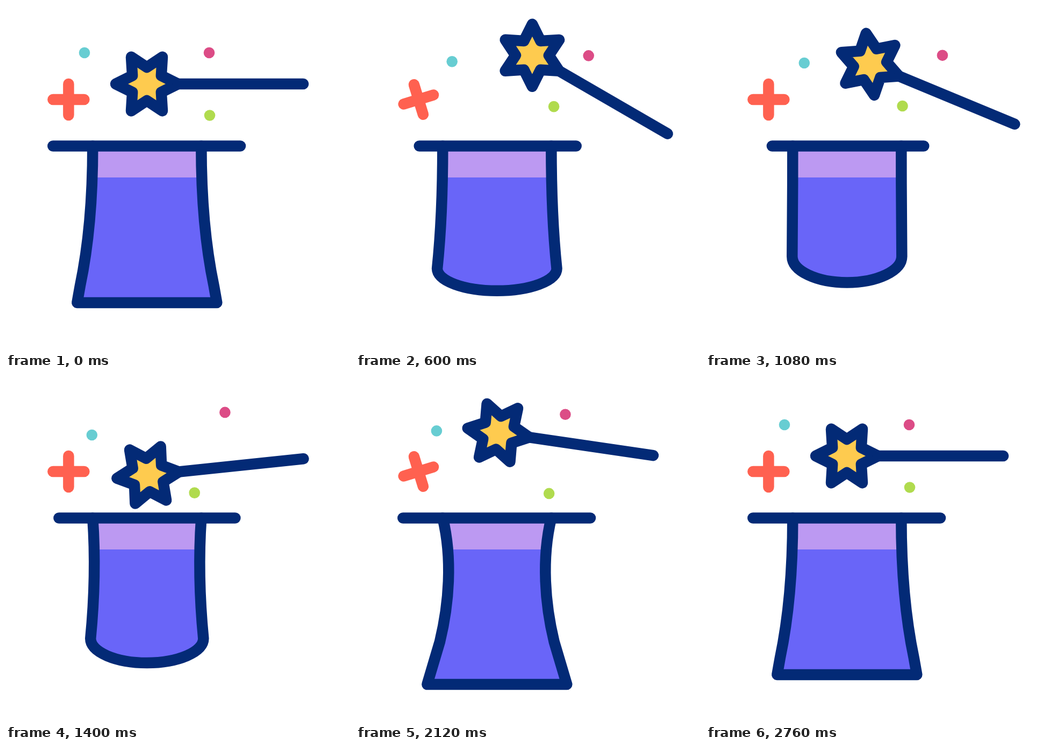
Recreate the animation shown at these times as an HTML page with a canvas. Size 640 by 640 pixels, loop 3 s.

```html
<!DOCTYPE html>
<html lang="en">
<head>
<meta charset="utf-8">
<title>Magic hat</title>
<style>
  html, body { margin: 0; width: 100%; height: 100%; overflow: hidden; background: #fff; }
  canvas { display: block; }
</style>
</head>
<body>
<canvas id="stage" width="640" height="640"></canvas>
<script>
const ctx = document.getElementById('stage').getContext('2d');
const LOOP = 3000, TAU = Math.PI * 2, DEG = TAU / 360;
const NAVY = '#032a76';
const HAT = { x: 262.3, top: 260.5, half: 101, foot: 130 };

const mix = (a, b, s) => a.map((v, i) => v + (b[i] - v) * s);

// Smooth step from 0 to 1 between two values.
function ramp(v, from, to) {
  const p = Math.min(1, Math.max(0, (v - from) / (to - from)));
  return p * p * (3 - 2 * p);
}

// Moves through the poses and back to the first; each leg is [start, end].
function cycle(t, poses, legs) {
  return legs.reduce(
    (pose, [start, end], i) => mix(pose, poses[(i + 1) % poses.length], ramp(t, start, end)),
    poses[0]);
}

const hatLegs = [[360, 790], [1155, 1864], [2060, 2740]];
const shoulderLegs = [hatLegs[0], [1155, 1500], hatLegs[2]];
const bellyPoses = [[101, 552], [101, 514.5], [82, 570.5]];         // waist, bottom
const shoulderPoses = [[124.5, 521], [102, 466], [105.8, 489.5]];   // half width, y

const wandLegs = [[0, 670], [914, 1462], [1690, 2180], [2270, 2760]];
const wandPoses = [[553, 145, 0], [580.5, 240.5, 31], [552.5, 147, -7.3], [553, 144, 9]]; // handle x, y, angle

const dotLegs = [[100, 755], [1015, 1577], [1650, 2740]];
const dots = [
  ['#67cdd2', [[146, 87], [184, 106], [152.5, 106]]],
  ['#dc4c86', [[378, 87], [441.6, 93.3], [397, 55]]],
  ['#b0db4e', [[379, 203.5], [366.3, 184.5], [346, 222.5]]]
];

const cloth = ctx.createLinearGradient(0, 318.5, 0, 319.5);
cloth.addColorStop(0, '#bc99f2');
cloth.addColorStop(1, '#6965f8');

function line(x1, y1, x2, y2) {
  ctx.beginPath();
  ctx.moveTo(x1, y1);
  ctx.lineTo(x2, y2);
  ctx.stroke();
}

// Half outline as cubic points: distance from the axis, y.
function hatSide(t) {
  const [waist, bottom] = cycle(t, bellyPoses, hatLegs);
  const [width, y] = cycle(t, shoulderPoses, shoulderLegs);
  const { top, half, foot } = HAT, height = y - top;
  const points = [
    [half, top],
    [waist, top + height / 3],
    [waist + (width - waist) * 0.3, top + height * 0.7]
  ];
  // The base turns from a round bowl into a flat foot as it drops.
  const flat = ramp(bottom, 532, 552);
  for (let i = 0; i <= 6; i++) {
    const a = i * 15 * DEG, r = i % 3 ? 1.0346 : 1;
    const bowl = [width * r * Math.cos(a), y + (bottom - y) * r * Math.sin(a)];
    const base = i < 3 ? mix([width, y], [foot, bottom], i / 3) : [foot * (2 - i / 3), bottom];
    points.push(mix(bowl, base, flat));
  }
  return points;
}

function drawHat(t) {
  const side = hatSide(t);
  const left = side.map(([x, y]) => [HAT.x - x, y]);
  const right = side.map(([x, y]) => [HAT.x + x, y]).reverse();
  const points = [...left, ...right.slice(1)];
  ctx.beginPath();
  ctx.moveTo(...points[0]);
  for (let i = 1; i < points.length; i += 3) {
    ctx.bezierCurveTo(...points[i], ...points[i + 1], ...points[i + 2]);
  }
  ctx.fillStyle = cloth;
  ctx.fill();
  ctx.strokeStyle = NAVY;
  ctx.stroke();
  const squeeze = ramp(t, 100, 785) - ramp(t, 1009, 1625);
  line(87.3 + 37 * squeeze, 260.6, 436 - 32 * squeeze, 260.6);
}

function drawDots(t) {
  for (const [color, poses] of dots) {
    ctx.beginPath();
    ctx.arc(...cycle(t, poses, dotLegs), 10.3, 0, TAU);
    ctx.fillStyle = color;
    ctx.fill();
  }
}

function drawPlus(t) {
  ctx.save();
  ctx.translate(116.4, 174);
  ctx.rotate(90 * DEG * (ramp(t, 150, 775) + ramp(t, 1673, 2294)));
  ctx.strokeStyle = '#ff6150';
  line(-29, 0, 29, 0);
  line(0, -29, 0, 29);
  ctx.restore();
}

function drawWand(t) {
  const [x, y, angle] = cycle(t, wandPoses, wandLegs);
  ctx.save();
  ctx.translate(x, y);
  ctx.rotate(angle * DEG);
  ctx.translate(-291, 0);
  ctx.beginPath();
  for (let i = 0; i < 12; i++) {
    const r = i % 2 ? 31 : 58, a = i * 30 * DEG;
    ctx.lineTo(r * Math.cos(a), r * Math.sin(a));
  }
  ctx.closePath();
  ctx.fillStyle = '#fecb4f';
  ctx.fill();
  ctx.strokeStyle = NAVY;
  ctx.stroke();
  line(58, 0, 291, 0);
  ctx.restore();
}

function draw() {
  const t = performance.now() % LOOP;
  ctx.clearRect(0, 0, 640, 640);
  ctx.lineWidth = 20.5;
  ctx.lineCap = ctx.lineJoin = 'round';
  drawHat(t);
  drawDots(t);
  drawPlus(t);
  drawWand(t);
  requestAnimationFrame(draw);
}
draw();
</script>
</body>
</html>
```
